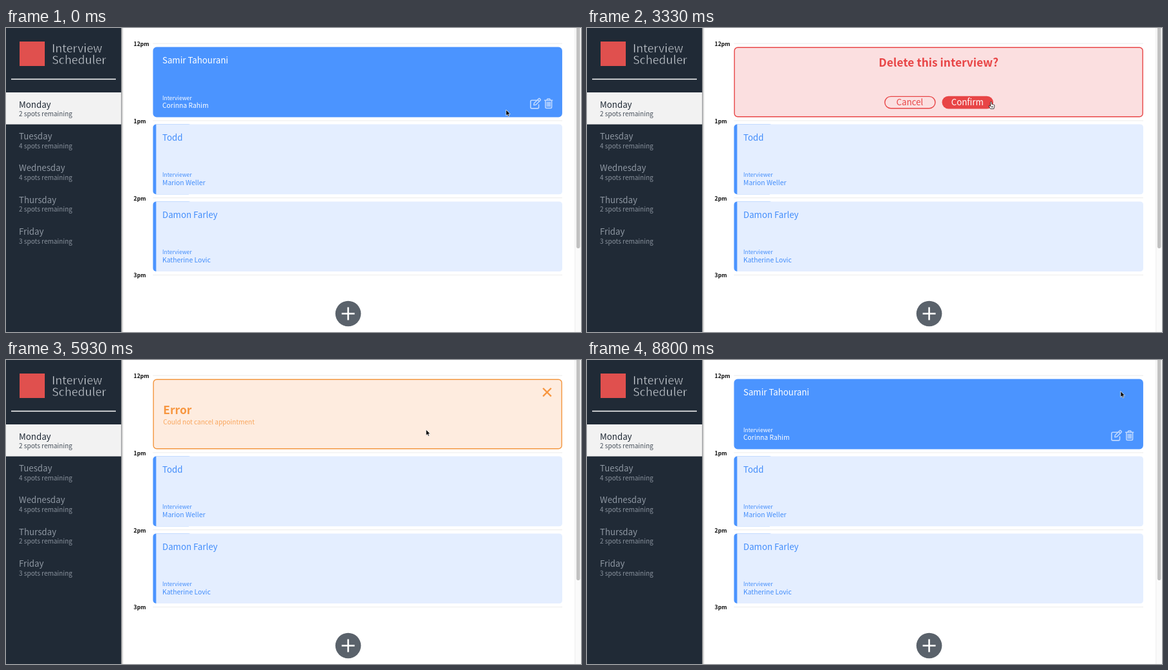
An HTML page that plays this animation: 890 by 472 pixels, repeating every 8.87 s.

```html
<!DOCTYPE html>
<html lang="en">
<head>
<meta charset="utf-8">
<title>Interview Scheduler</title>
<style>
  html, body { margin: 0; width: 100%; height: 100%; overflow: hidden; background: #fff; }
  svg { display: block; width: 890px; height: 472px; }
  text {
    font-family: "Noto Sans CJK JP", "Noto Sans CJK SC", "Noto Sans CJK", "Noto Sans", sans-serif;
    font-weight: 400;
    white-space: pre;
  }
  .title { font-size: 17.8px; fill: #d3d8de; stroke: #202a36; stroke-width: .5px; }
  .name { font-size: 13.28px; }
  .person { font-size: 10.35px; }
  .note { font-size: 10px; }
  .label { font-size: 8.56px; }
  .hour { font-size: 8.7px; font-weight: 700; fill: #111; }
  .head { font-size: 17.35px; font-weight: 700; }
  .mid { text-anchor: middle; }
  .icon { fill: none; stroke: #c0d9ff; stroke-width: 1.6; stroke-linejoin: round; stroke-linecap: round; }
</style>
</head>
<body>
<svg id="stage" viewBox="0 0 890 472" xmlns="http://www.w3.org/2000/svg"></svg>
<script>
const LOOP = 8870, PITCH = 119.8, BLUE = '#4b94ff', DARK = '#202a36', RED = '#e84546', ORANGE = '#f7963f';

const text = (x, y, cls, str, fill = '') =>
  `<text x="${x}" y="${y}" class="${cls}"${fill && ` fill="${fill}"`}>${str}</text>`;
const rect = (x, y, w, h, fill, extra = '') =>
  `<rect x="${x}" y="${y}" width="${w}" height="${h}" fill="${fill}" ${extra}/>`;
const path = (d, extra = '') => `<path d="${d}" ${extra}/>`;

const days = [['Monday', 2], ['Tuesday', 4], ['Wednesday', 4], ['Thursday', 2], ['Friday', 3]];

function sidebar() {
  const rows = days.map(([day, spots], i) => {
    const y = 123.5 + i * 49.45, active = i === 0;
    return text(20, y, 'name', day, active ? '#1f2935' : '#8e97a2') +
      text(20, y + 13.6, 'note', `${spots} spots remaining`, active ? '#47505b' : '#8a939e');
  }).join('');
  return rect(178, 0, 4, 472, 'url(#shade)') +
    rect(0, 0, 178.3, 472, DARK) +
    rect(21, 21, 39, 38, '#e0504e') +
    text(71, 38, 'title', 'Interview') + text(71, 55.5, 'title', 'Scheduler') +
    rect(8, 78.7, 162, 1.5, '#fff') +
    rect(0, 100, 178.3, 49.6, '#f2f2f2') + rows;
}

function details(i, name, interviewer, fill) {
  const y = i * PITCH;
  return text(242, y + 55, 'name', name, fill) +
    text(242, y + 111.6, 'label', 'Interviewer', fill) +
    text(242, y + 124.3, 'person', interviewer, fill);
}

function card(i, name, interviewer) {
  const y = 29.8 + i * PITCH;
  return rect(227.5, y, 60, 108.6, BLUE, 'rx="5"') +
    path(`M232.4 ${y}H856q5 0 5 5v98.6q0 5-5 5H232.4z`, 'fill="#e4eeff"') +
    details(i, name, interviewer, '#428dfb');
}

const hours = ['12pm', '1pm', '2pm', '3pm'].map((h, i) =>
  text(197.5, 28 + i * PITCH, 'hour', h) +
  rect(227.5, 23.6 + i * PITCH, 633.5, 1, '#ececec')).join('');

const panel = (fill, stroke) =>
  rect(228.2, 30.2, 632, 107.6, fill, `rx="5" stroke="${stroke}" stroke-width="1.4"`);

const panels = {
  show: panel(BLUE, BLUE) + details(0, 'Samir Tahourani', 'Corinna Rahim', '#fff') +
    `<g class="icon">${path('M821.5 112.3h-7.7q-1.8 0-1.8 1.8v9q0 1.8 1.8 1.8h9q1.8 0 1.8-1.8v-4')}
    ${path('M817 119.7l.5-3 7-7q.8-.7 1.6 0l1 1q.7.8 0 1.6l-7 7zM823 111.4l2.4 2.5')}</g>` +
    `<g class="icon" id="trash">${path('M833.7 112.2h12M837 112l1-2h3.6l1 2M835 112.4v10.4q0 1.7 1.7 1.7h6.2q1.7 0 1.7-1.7v-10.4M837.6 115v6.7M839.8 115v6.7M842 115v6.7')}</g>`,
  confirm: panel('#fbdfe0', RED) +
    text(544.3, 60.3, 'head mid', 'Delete this interview?', RED) +
    rect(461, 106.4, 78, 18.4, 'none', `rx="9.2" stroke="${RED}" stroke-width="1.4"`) +
    rect(549.5, 105.7, 79.3, 19.8, RED, 'rx="9.9"') +
    text(499.5, 120.3, 'name mid', 'Cancel', RED) + text(588.7, 120.3, 'name mid', 'Confirm', '#fff'),
  deleting: panel(DARK, DARK) +
    '<circle cx="498.7" cy="84" r="13.6" fill="none" stroke="#4d555e" stroke-width="2.6"/>' +
    path('M489.1 93.6A13.6 13.6 0 0 1 489.1 74.4', 'id="arc" fill="none" stroke="#fff" stroke-width="2.6"') +
    text(533, 90.4, 'head', 'Deleting', '#fff'),
  error: panel('#feecdf', '#f3963f') +
    text(243.3, 84.2, 'head', 'Error', ORANGE) +
    text(243.3, 99.6, 'note', 'Could not cancel appointment', '#f9a65d') +
    path('M831.2 43.8l12.6 12.6M843.8 43.8l-12.6 12.6', `stroke="${ORANGE}" stroke-width="2.3"`)
};

const stage = document.getElementById('stage');
stage.innerHTML =
  `<defs><linearGradient id="shade"><stop stop-color="#000" stop-opacity=".38"/><stop offset="1" stop-color="#000" stop-opacity="0"/></linearGradient></defs>` +
  rect(0, 0, 890, 472, '#fff') + sidebar() + hours +
  card(1, 'Todd', 'Marion Weller') + card(2, 'Damon Farley', 'Katherine Lovic') +
  Object.entries(panels).map(([id, body]) => `<g id="${id}">${body}</g>`).join('') +
  '<circle cx="529.6" cy="443.5" r="19.8" fill="#5a626b"/>' +
  path('M519.6 443.5h20M529.6 433.5v20', 'stroke="#fff" stroke-width="2.6"') +
  rect(880.5, 0, 9.5, 472, '#fafafa') + rect(880.5, 0, .7, 472, '#e6e6e6') +
  rect(882.9, -4, 5.6, 346, '#c1c1c1', 'rx="2.8"') +
  `<g id="cursor">
    ${path('M0 0V9.2L2.1 7.3 3.5 10.4 5 9.7 3.7 6.7H6.5z', 'id="arrow" fill="#000" stroke="#fff" stroke-width=".7"')}
    ${path('M-1 5.4V1Q-1 0 0 0T1 1V3.8Q2.2 3.2 2.6 4.2 3.7 3.7 4.1 4.7 5.2 4.4 5.2 5.6V7.6L4.2 10.8H-.9L-3.5 7.2Q-4 6-2.7 5.9L-1 7.2zM1 6.6V9M2.6 6.6V9', 'id="hand" fill="#fff" stroke="#000" stroke-width=".75" stroke-linejoin="round"')}
  </g>`;

// [time, panel]
const scenes = [[0, 'show'], [2130, 'confirm'], [3983, 'deleting'], [5200, 'error'], [7950, 'show']];
// [time, pointer shape]
const pointers = [[0, 'arrow'], [680, 'hand'], [2130, 'arrow'], [3080, 'hand'], [3983, 'arrow'], [7560, 'hand'], [7950, 'arrow']];
// [time, x, y] of the pointer tip
const moves = [
  [0, 774, 127], [120, 776, 127], [800, 838.5, 121], [2350, 838.5, 121], [3150, 632, 116],
  [3330, 625.5, 114.6], [3700, 617.5, 114], [5550, 617.5, 114], [5930, 650, 108],
  [6530, 753, 75], [7260, 802, 60], [7460, 820, 54], [7620, 837, 49.5],
  [8400, 837, 49.5], [8750, 826, 48.5], [LOOP, 826, 48.5]
];

const el = id => document.getElementById(id);
const current = (steps, t) => steps.filter(s => s[0] <= t).pop()[1];
const showOnly = (steps, id) => new Set(steps.map(s => s[1])).forEach(k => {
  el(k).style.display = k === id ? '' : 'none';
});

function pointerAt(t) {
  const i = moves.findIndex(m => m[0] > t);
  const [t0, x0, y0] = moves[i - 1], [t1, x1, y1] = moves[i];
  const k = (t - t0) / (t1 - t0);
  return [x0 + (x1 - x0) * k, y0 + (y1 - y0) * k];
}

function draw() {
  const t = performance.now() % LOOP;
  const shape = current(pointers, t);
  showOnly(scenes, current(scenes, t));
  showOnly(pointers, shape);
  el('trash').style.stroke = shape === 'hand' ? '#fff' : '';
  el('arc').setAttribute('transform', `rotate(${(t - 3983) / 1100 * 360} 498.7 84)`);
  el('cursor').setAttribute('transform', `translate(${pointerAt(t)})`);
  requestAnimationFrame(draw);
}
draw();
</script>
</body>
</html>
```
